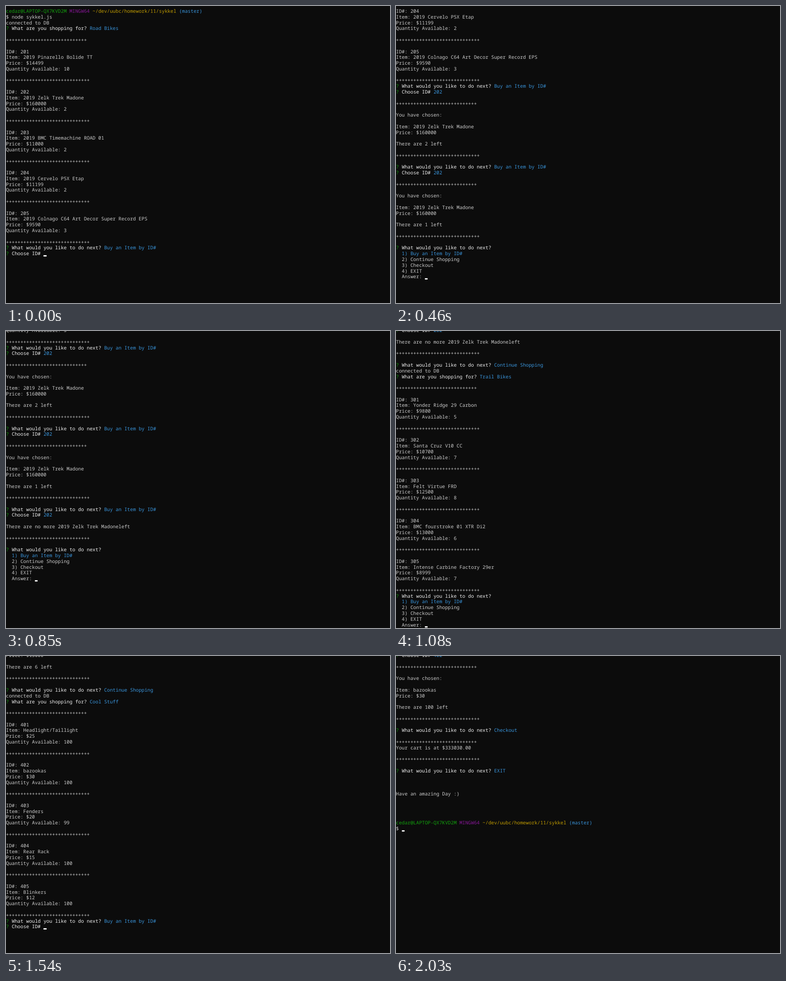
These frames come from a looping animation (851 px wide and 658 px high, 2.18 s). An HTML page:

```html
<!DOCTYPE html>
<html lang="en">
<head>
<meta charset="utf-8">
<title>Bike shop terminal</title>
<style>
html, body { margin: 0; width: 100%; height: 100%; overflow: hidden; background: #0c0c0c; }
#term {
  position: relative; width: 851px; height: 658px; overflow: hidden;
  background: #0c0c0c; color: #ccc;
  font: 500 10.66px/12.79px "Noto Sans Mono", "DejaVu Sans Mono", monospace;
  font-variant-ligatures: none; text-rendering: geometricPrecision;
}
.row { position: absolute; left: 0; height: 12.79px; white-space: pre; }
.green { color: #13a10e; }
.purple { color: #881798; }
.gold { color: #c19c00; }
.blue { color: #3a96dd; }
.white { color: #f2f2f2; }
.cursor { position: absolute; left: 100%; top: 8.6px; width: 6.4px; height: 3px; background: #f2f2f2; }
</style>
</head>
<body>
<div id="term"></div>
<script>
const LOOP = 2180, PITCH = 12.79, TOP = 6, ROWS = 51;
const term = document.getElementById('term');

const paint = (color, text) => `<span class="${color}">${text}</span>`;
const ask = (question, answer = '') =>
  paint('green', '?') + ' ' + paint('white', question) + ' ' + paint('blue', answer);
const rule = n => '+'.repeat(n);

const NEXT = 'What would you like to do next?';
const SHOP = 'What are you shopping for?';
const ACTIONS = ['Buy an Item by ID#', 'Continue Shopping', 'Checkout', 'EXIT'];
const AISLES = ['Road Bikes', 'Trail Bikes', 'City Bikes', 'Cool Stuff'];

const shell = paint('green', 'cedar@LAPTOP-QX7KVD2M') + ' ' + paint('purple', 'MINGW64') + ' ' +
  paint('gold', '~/dev/uubc/homework/11/sykkel') + ' ' + paint('blue', '(master)');

const log = [];
const add = (...lines) => log.push(...lines);

function list(aisle, first, items) {
  add('connected to DB', ask(SHOP, aisle), '', rule(28));
  items.forEach(([name, price, stock], i) => add('',
    `ID#: ${first + i}`, `Item: ${name}`, `Price: $${price}`, `Quantity Available: ${stock}`,
    '', rule(29)));
}

function choose(id) {
  add(ask(NEXT, ACTIONS[0]), ask('Choose ID#', id), '');
}

function buy(id, name, price, left) {
  choose(id);
  add(rule(28), '', 'You have chosen:', '', `Item: ${name}`, `Price: $${price}`, '',
    `There are ${left} left`, '', rule(29), '');
}

// The whole session, one entry per terminal line
const star = '2019 Zelk Trek Madone';
add(shell, '$ node sykkel.js');
list('Road Bikes', 201, [
  ['2019 Pinarello Bolide TT', 14499, 10],
  [star, 160000, 2],
  ['2019 BMC Timemachine ROAD 01', 11000, 2],
  ['2019 Cervelo P5X Etap', 11199, 2],
  ['2019 Colnago C64 Art Decor Super Record EPS', 9590, 3]
]);
buy(202, star, 160000, 2);
buy(202, star, 160000, 1);
choose(202);
add(`There are no more ${star}left`, '', rule(29), '');
add(ask(NEXT, ACTIONS[1]));
list('Trail Bikes', 301, [
  ['Yonder Ridge 29 Carbon', 9800, 5],
  ['Santa Cruz V10 CC', 10700, 7],
  ['Felt Virtue FRD', 12500, 8],
  ['BMC fourstroke 01 XTR Di2', 13000, 6],
  ['Intense Carbine Factory 29er', 8999, 7]
]);
buy(304, 'BMC fourstroke 01 XTR Di2', 13000, 6);
add(ask(NEXT, ACTIONS[1]));
list('Cool Stuff', 401, [
  ['Headlight/Taillight', 25, 100],
  ['bazookas', 30, 100],
  ['Fenders', 20, 99],
  ['Rear Rack', 15, 100],
  ['Blinkers', 12, 100]
]);
buy(402, 'bazookas', 30, 100);
add(ask(NEXT, ACTIONS[2]), '', rule(28), 'Your cart is at $333030.00', '', rule(29), '');
add(ask(NEXT, ACTIONS[3]), '', '', '', 'Have an amazing Day :)', '', '', '', '', shell);

// Live prompts shown below the finished lines
function menu(question, options, typed = '') {
  const lit = (typed || 1) - 1;
  return [ask(question),
    ...options.map((text, i) => {
      const line = `${i + 1}) ${text}`;
      return '  ' + (i === lit ? paint('blue', line) : line);
    }),
    '  Answer: ' + typed];
}
const next = typed => menu(NEXT, ACTIONS, typed);
const pickId = [ask('Choose ID#')];
const ready = ['$ '];

// start ms, first visible line, finished lines, live prompt, cursor hidden
const steps = [
  [0, 0, 42, pickId],
  [80, 4, 42, pickId],
  [150, 5, 42, pickId, true],
  [230, 5, 42, pickId],
  [310, 14, 55, next()],
  [390, 14, 56, pickId],
  [460, 28, 69, next()],
  [540, 28, 70, pickId],
  [620, 35, 76, next()],
  [700, 37, 76, next()],
  [770, 39, 76, next(), true],
  [850, 39, 76, next()],
  [930, 39, 76, next(2)],
  [1000, 39, 78, menu(SHOP, AISLES)],
  [1080, 71, 116, next()],
  [1150, 71, 117, pickId],
  [1230, 89, 130, next(), true],
  [1310, 89, 130, next(2)],
  [1390, 89, 132, menu(SHOP, AISLES)],
  [1460, 125, 170, next()],
  [1540, 125, 171, pickId],
  [1620, 145, 184, next()],
  [1720, 145, 184, next(3)],
  [1800, 152, 191, next()],
  [1880, 152, 191, next(4)],
  [1950, 157, 201, ready],
  [2030, 172, 201, ready]
];

function draw([, first, done, live, hidden]) {
  const lines = [...log.slice(0, done), ...live];
  let html = '';
  for (let r = -1; r < ROWS; r++) {
    const i = first + r;
    if (!lines[i]) continue;
    const cursor = i === lines.length - 1 && !hidden ? '<i class="cursor"></i>' : '';
    html += `<div class="row" style="top:${(TOP + r * PITCH).toFixed(2)}px">${lines[i]}${cursor}</div>`;
  }
  term.innerHTML = html;
}

let shown = null;
function tick() {
  const t = performance.now() % LOOP;
  const step = steps.findLast(s => s[0] <= t);
  if (step !== shown) draw(shown = step);
  requestAnimationFrame(tick);
}
tick();
</script>
</body>
</html>
```
